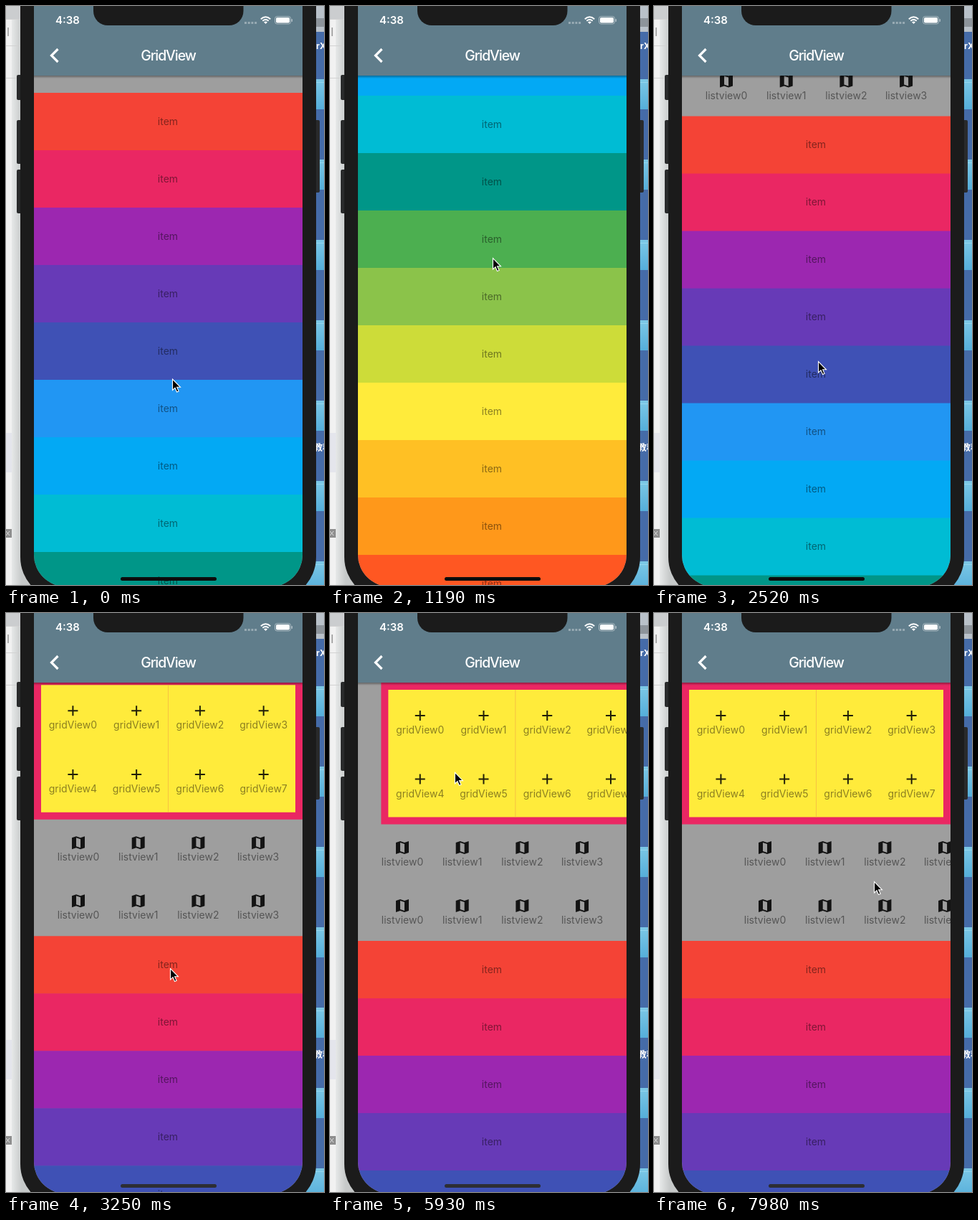
An HTML page that plays this animation: 444x807 px, repeating every 8000 ms.

```html
<!DOCTYPE html>
<html lang="en">
<head>
<meta charset="utf-8">
<title>Scrolling grid</title>
<style>
  html, body { margin: 0; width: 100%; height: 100%; overflow: hidden; }
  svg { display: block; width: 444px; height: 807px; font: 14px Inter, sans-serif; }
  .label { text-anchor: middle; fill: #000; fill-opacity: .46; }
  .icon { fill: #000; fill-opacity: .87; }
  .title { font-size: 19.5px; font-weight: 500; letter-spacing: -1.1px; text-anchor: middle; fill: #fff; }
  .clock { font-size: 15px; font-weight: 600; fill: #fff; }
  .desk { font: bold 12px Inter, "Noto Sans CJK SC", "Noto Sans CJK", sans-serif; fill: #fff; }
</style>
</head>
<body>
<svg viewBox="0 0 444 807">
  <defs>
    <clipPath id="screen"><rect x="39" y="-100" width="375" height="909" rx="44"/></clipPath>
    <linearGradient id="shade" x2="0" y2="1">
      <stop stop-opacity=".36"/><stop offset="1" stop-opacity="0"/>
    </linearGradient>
    <linearGradient id="edge">
      <stop stop-color="#e6e8e8"/><stop offset="1" stop-color="#c6c9c9"/>
    </linearGradient>
    <linearGradient id="folder" x2="0" y2="1">
      <stop stop-color="#7cc8e6"/><stop offset="1" stop-color="#55aeda"/>
    </linearGradient>
    <path id="map" d="M3 5l6-2 6 2 6-2v16l-6 2-6-2-6 2zM9 5v12l6 2V7z" fill-rule="evenodd"/>
    <path id="plus" d="M11 5h2v6h6v2h-6v6h-2v-6H5v-2h6z"/>
  </defs>

  <g id="desktop">
    <rect width="444" height="807" fill="#c6c9c9"/>
    <rect width="8" height="807" fill="#f1f1f1"/>
    <rect x="8" width="14" height="807" fill="url(#edge)"/>
    <rect width="40" height="18" fill="#cbcdcf"/>
    <path d="M0 18.5H20M0 55.5H20M0 100.5H20" stroke="#d2d2d2"/>
    <path d="M23 2.5h8M27 0v6M3 30v12" stroke="#666"/>
    <rect y="595" width="8" height="55" fill="#e4e5ec"/>
    <rect y="729" width="8" height="12" fill="#8e8e8e"/>
    <path d="M0 732l5 6m0-6l-5 6" stroke="#ddd"/>
    <rect x="390" width="54" height="807" fill="#456ba8"/>
    <rect x="390" width="54" height="36" fill="#b9c1c9"/>
    <path d="M433 17h11v12h-11z" fill="#8d949b"/>
  </g>

  <g fill="#292a2b">
    <rect x="15" y="96" width="10" height="35" rx="2"/>
    <rect x="15" y="159" width="10" height="61" rx="2"/>
    <rect x="15" y="228" width="10" height="61" rx="2"/>
    <rect x="428" y="159" width="10" height="101" rx="2"/>
  </g>
  <rect x="20" y="-100" width="413" height="928" rx="60" fill="#1b1b1b"/>

  <g clip-path="url(#screen)">
    <rect x="39" width="375" height="809" fill="#9e9e9e"/>
    <g id="page">
      <g id="grid">
        <rect x="39" y="97" width="375" height="197.5" fill="#ea2763"/>
        <rect x="49" y="107" width="355" height="177.5" fill="#ffeb3b"/>
        <path d="M226.5 107v177.5" stroke="#f5b843" stroke-width=".8"/>
      </g>
      <g id="list"></g>
      <g id="items"></g>
    </g>
    <rect x="39" y="97" width="375" height="4" fill="url(#shade)"/>
    <rect x="39" width="375" height="97" fill="#607d8b"/>
  </g>

  <rect x="122" y="-40" width="209.5" height="67" rx="20" fill="#1b1b1b"/>
  <text class="clock" x="69" y="25">4:38</text>
  <path d="M72.5 60L63.5 69L72.5 78" fill="none" stroke="#fff" stroke-width="3.2"/>
  <text class="title" x="226.5" y="76">GridView</text>
  <g fill="#fff">
    <path d="M333 23.5h18" stroke="#fff" stroke-opacity=".35" stroke-width="3" stroke-dasharray="3 1.7"/>
    <path d="M360 22.5q2.5-2 5 0L362.5 25z"/>
    <path d="M355.8 18.2q6.7-5.8 13.4 0M358.3 20.8q4.2-3.5 8.4 0" fill="none" stroke="#fff" stroke-width="1.9"/>
    <rect x="375.5" y="14.5" width="22" height="10.5" rx="3" fill="none" stroke="#fff" stroke-opacity=".45"/>
    <rect x="377" y="16" width="19" height="7.5" rx="1.7"/>
    <rect x="398.5" y="18" width="1.5" height="4" rx=".7" opacity=".5"/>
  </g>
  <rect id="home" x="160" y="796" width="134" height="5" rx="2.5"/>
  <path id="cursor" d="M0 0v15.5l3.5-3.3 2.500 5.800 2.600-1.100-2.500-5.600h4.900z" stroke="#fff" stroke-width="1.1"/>
</svg>

<script>
const LOOP = 8000, STEP = 147.8;
const $ = id => document.getElementById(id);
const add = (id, markup) => $(id).insertAdjacentHTML('beforeend', markup);

const label = (x, y, text) => `<text class="label" x="${x}" y="${y}">${text}</text>`;
const tile = (icon, x, y, text) =>
  `<use href="#${icon}" class="icon" x="${x - 12}" y="${y - 12}"/>` + label(x, y + 25, text);

for (let y = 102; y < 807; y += 112)
  add('desktop', `<rect x="390" y="${y}" width="54" height="42" fill="url(#folder)"/>
    <path d="M390 ${y + 4.5}h54" stroke="#94d6ee"/>`);
add('desktop', '<text class="desk" x="433" y="60">rX</text><text class="desk" x="430" y="620">教程</text>');

for (let i = 0; i < 8; i++) {
  const column = i % 4, row = i >> 2;
  add('grid', tile('plus', 93.4 + column * 88.75, 143 + row * 88.6, 'gridView' + i));
  add('list', tile('map', 101 + column * 83.7, 327 + row * 81, 'listview' + column));
}

const colors = ['#f44336', '#ea2763', '#9c27b0', '#673ab7', '#3f51b5', '#2196f3', '#03a9f4', '#00bcd4',
  '#009688', '#4caf50', '#8bc34a', '#cddc39', '#ffeb3b', '#ffc024', '#ff981a', '#ff5722'];
colors.forEach((color, i) => {
  const y = 457 + i * 80;
  add('items', `<rect x="39" y="${y}" width="375" height="80.5" fill="${color}"/>` + label(226, y + 44.5, 'item'));
});

const move = (id, x, y) => $(id).setAttribute('transform', `translate(${x} ${y})`);

function pose(t) {
  const progress = (from, to) => Math.min(1, Math.max(0, (t - from) / (to - from)));
  const drag = (from, to) => { const u = progress(from, to); return u * u * (3 - 2 * u); };
  const fling = (from, to) => 1 - (1 - progress(from, to)) ** 3;
  const swing = (from, to) => Math.sin(Math.PI * progress(from, to));

  const scroll = 336 + 556 * fling(0, 1190) - 588 * drag(1204, 2512) - 304 * fling(2512, 3540);
  move('page', 0, -scroll);
  move('grid', 42 * swing(5300, 6150) - 34.5 * swing(4590, 5300), 0);
  move('list', 54 * drag(7500, 7980) - 27 * swing(6950, 7500), 0);
  $('home').setAttribute('fill', scroll < 200 ? '#2d2e34' : '#0c0c0c');

  const x = 232.5 - 5 * drag(0, 590) - 3 * drag(1190, 1625) + 5 * drag(1900, 2512) + 24 * swing(3540, 4400)
    - 97 * drag(4400, 4870) - 20 * swing(4870, 5300) + 135 * drag(5300, 6950)
    - 50 * swing(6950, 7500) + 40 * drag(7500, 7980);
  const y = 520 - 168.5 * drag(0, 590) + 147 * drag(1190, 1625) - 110 * drag(1900, 2200) + 107 * drag(2200, 2512)
    - 277 * drag(3540, 4870) + 143 * drag(5800, 6950) + 13 * drag(6950, 7980);
  move('cursor', x, y);
}

function play(now) {
  pose(Math.floor((now % LOOP + 8) / STEP) * STEP);
  requestAnimationFrame(play);
}
play(0);
</script>
</body>
</html>
```
